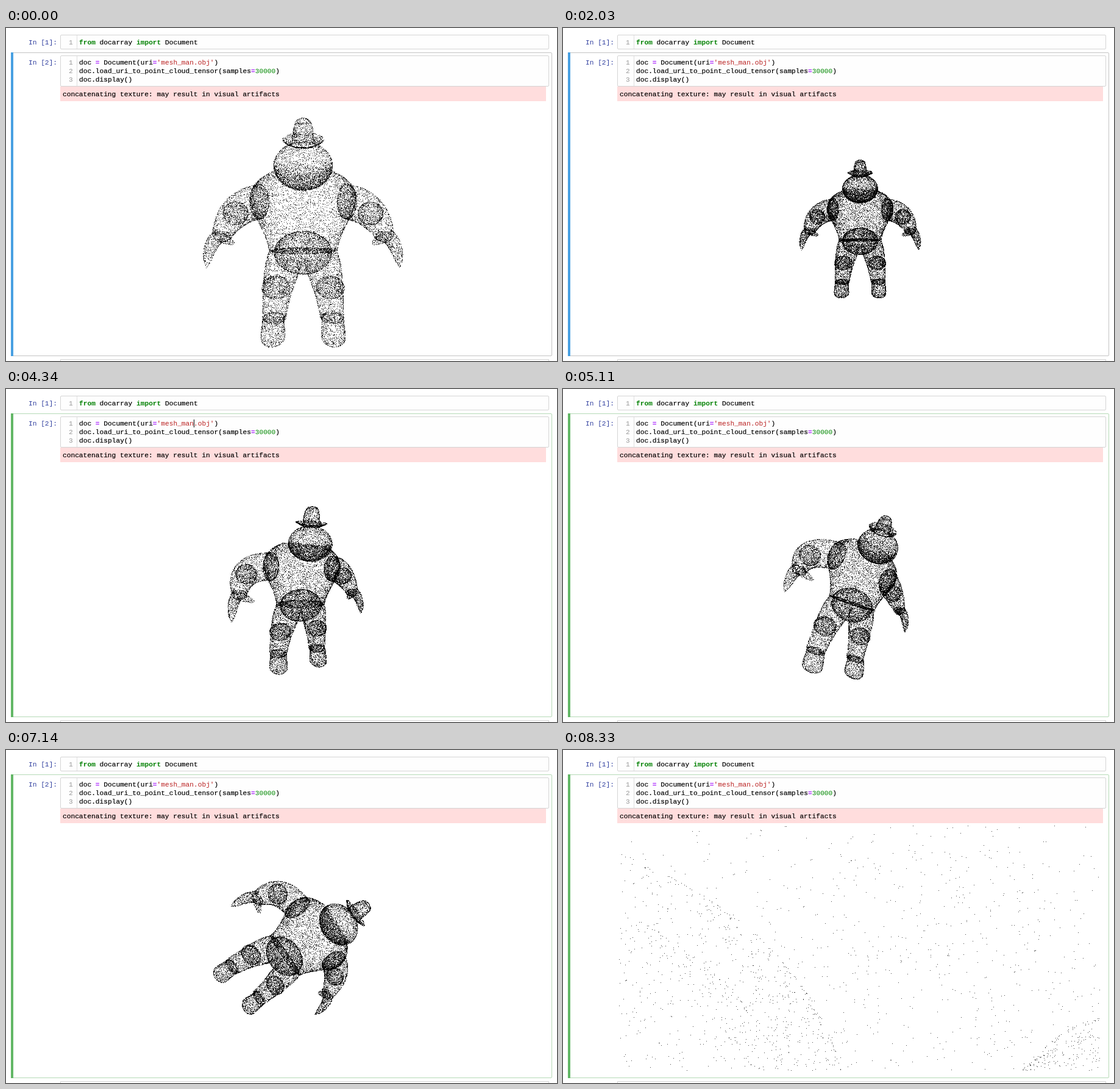
An HTML page with a canvas that plays this animation: 904 by 546 pixels, repeating every 8.4 s.

```html
<!DOCTYPE html>
<html lang="en">
<head>
<meta charset="utf-8">
<title>Point cloud notebook</title>
<style>
html, body { margin: 0; width: 100%; height: 100%; overflow: hidden; background: #fff; }
svg, canvas { position: absolute; left: 0; top: 0; display: block; }
canvas { left: 92px; top: 124px; }
text { font: 11.2px "Liberation Mono", "Courier New", monospace; white-space: pre; fill: #000; stroke: #000; stroke-width: .2px; }
.prompt, .num, tspan { stroke: none; }
.prompt { fill: #303f9f; }
.num { fill: #999; }
.kw { fill: #008000; font-weight: bold; }
.op { fill: #a2f; font-weight: bold; }
.str { fill: #ba2121; }
.lit { fill: #080; }
.box { fill: #fefefe; stroke: #d4d4d4; }
.gutter { stroke: #ddd; }
#frame { fill: #fff; stroke: #c4c4c4; }
#bar { fill: #48a0e2; }
.edit #frame { stroke: #b5dab6; }
.edit #bar { fill: #62b766; }
</style>
</head>
<body>
<svg id="page" width="904" height="546" viewBox="0 0 904 546">
  <rect class="box" x="89.5" y="11.5" width="801" height="23" rx="1.5"/>
  <rect id="frame" x="8.5" y="40.5" width="887" height="497" rx="1.5"/>
  <rect id="bar" x="8" y="40" width="4" height="498"/>
  <rect class="box" x="89.5" y="45.5" width="801" height="50" rx="1.5"/>
  <path class="gutter" d="M116.5 12V34M116.5 46V95"/>
  <rect x="89" y="96" width="797" height="24" fill="#fdd"/>
  <path d="M89.5 546V543.5H890.5V546" fill="none" stroke="#d4d4d4"/>
  <text class="prompt" x="37" y="26.5">In [1]:</text>
  <text class="prompt" x="37" y="60">In [2]:</text>
  <text class="num" x="103" y="26.5">1</text>
  <text class="num" x="103" y="60">1</text>
  <text class="num" x="103" y="74">2</text>
  <text class="num" x="103" y="87.5">3</text>
  <text x="120" y="26.5"><tspan class="kw">from</tspan> docarray <tspan class="kw">import</tspan> Document</text>
  <text x="120" y="60">doc <tspan class="op">=</tspan> Document(uri<tspan class="op">=</tspan><tspan class="str">'mesh_man.obj'</tspan>)</text>
  <text x="120" y="74">doc.load_uri_to_point_cloud_tensor(samples<tspan class="op">=</tspan><tspan class="lit">30000</tspan>)</text>
  <text x="120" y="87.5">doc.display()</text>
  <text x="93" y="111.5">concatenating texture: may result in visual artifacts</text>
  <rect id="caret" x="308" y="50" width="1" height="13"/>
</svg>
<canvas id="view" width="790" height="402"></canvas>
<script>
const LOOP = 8400, STEP = 70, W = 790, H = 402;
const MIDX = 487.5, MIDY = 319, FOCAL = 348, SLICES = 24;
const page = document.getElementById('page');
const caret = document.getElementById('caret');
const ctx = document.getElementById('view').getContext('2d');
const image = ctx.createImageData(W, H);
const alpha = image.data;
const cloud = [];

let seed = 20477;
function rnd() {
  seed = (seed + 0x6D2B79F5) | 0;
  let v = Math.imul(seed ^ (seed >>> 15), 1 | seed);
  v = (v + Math.imul(v ^ (v >>> 7), 61 | v)) ^ v;
  return ((v ^ (v >>> 14)) >>> 0) / 4294967296;
}
const mix = (a, b, u) => a + (b - a) * u;
const span = (t, a, b) => Math.min(1, Math.max(0, (t - a) / (b - a)));

// x, y are stage pixels in the opening view of a part centred at depth z.
function add(x, y, z, dz) {
  const k = 1 - z / FOCAL;
  cloud.push((x - MIDX) * k, (MIDY - y) * k, z + dz);
}

// Skin around the curve a-c-b with radius(u); flat = depth / width.
function tube(a, c, b, radius, flat, density) {
  const at = (u, k) => mix(mix(a[k], c[k], u), mix(c[k], b[k], u), u);
  const slope = (u, k) => 2 * mix(c[k] - a[k], b[k] - c[k], u);
  for (let i = 0; i < SLICES; i++) {
    const mid = (i + 0.5) / SLICES;
    const length = Math.hypot(slope(mid, 0), slope(mid, 1)) / SLICES;
    const flare = radius((i + 1) / SLICES) - radius(i / SLICES);
    const area = Math.PI * radius(mid) * (1 + flat) * Math.hypot(length, flare);
    for (let n = area * density - rnd(); n > 0; n--) {
      const u = (i + rnd()) / SLICES, turn = rnd() * 2 * Math.PI, r = radius(u);
      const dx = slope(u, 0), dy = slope(u, 1), c = r * Math.cos(turn) / Math.hypot(dx, dy);
      add(at(u, 0) + dy * c, at(u, 1) - dx * c, at(u, 2), r * flat * Math.sin(turn));
    }
  }
}
function column(top, bottom, z, radius, flat, density) {
  const a = [MIDX, top, z], b = [MIDX, bottom, z];
  tube(a, a.map((v, k) => (v + b[k]) / 2), b, radius, flat, density);
}
function ball(x, y, z, rx, ry, rz, count, from = -1) {
  while (count-- > 0) {
    const w = mix(from, 1, rnd()), a = rnd() * 2 * Math.PI, s = Math.sqrt(1 - w * w);
    add(x + rx * s * Math.cos(a), y + ry * w, z, rz * s * Math.sin(a));
  }
}

function buildMan() {
  column(152, 187, 22, u => 18.5 * u ** 0.17, 1, 0.13);           // hat
  column(192, 184, 22, u => 18 + 16 * u, 0.9, 0.3);
  ball(MIDX, 228, 24, 48, 38, 42, 1900);                          // head
  ball(MIDX, 228, 20, 47, 37, 40, 1350, 0);
  column(236, 365, -4, u => 47 + 9 * u + 36 * Math.sin(Math.PI * u ** 0.6) ** 1.5, 0.6, 0.078);
  ball(MIDX, 365, -4, 52, 2, 36, 900);                            // waist
  ball(MIDX, 368, -4, 47, 35, 36, 2300);

  for (const side of [1, -1]) {
    const sx = x => MIDX + side * (x - MIDX);
    const flip = ([x, y, z]) => [sx(x), y, z];
    const limb = (a, c, b, ...skin) => tube(flip(a), flip(c), flip(b), ...skin);
    const joint = (x, ...rest) => ball(sx(x), ...rest);
    joint(416, 285, -4, 15, 29, 25, 850);
    limb([416, 285, -4], [369, 293, -44], [353, 344, 0], u => 28 - 14 * u ** 2.2, 0.85, 0.1);
    joint(377, 304, -23, 20, 19, 18, 600);
    joint(355, 342, -2, 14, 9, 11, 200);
    limb([351, 340, 0], [332, 352, 14], [329, 394, 20], u => (12 - 4 * u) * (1 - u ** 6), 0.8, 0.16);
    limb([352, 343, 0], [364, 348, 8], [374, 354, 16], u => 8 - 6 * u * u, 1, 0.16);
    limb([461, 368, -4], [444, 420, -6], [440, 476, -4], u => 27 - 8 * u + 30 * u * (1 - u) ** 3, 0.85, 0.1);
    joint(443, 425, -5, 23, 18, 20, 680);
    joint(440, 475, -4, 18, 6, 16, 280);
    limb([439, 472, -2], [438, 495, 5], [438, 518, 6], u => (17 + 4 * u) * (1 - u ** 12), 1.15, 0.11);
  }
}

// Body axes (right, up) at the moments the drag changes direction.
const POSES = [
  [3850, [1, 0, 0], [0, 1, 0]],
  [4340, [0.913, 0, -0.4], [0.06, 0.985, 0.14]],
  [5880, [0.54, -0.64, -0.545], [0.44, 0.79, -0.43]],
  [6860, [0.56, -0.79, -0.26], [0.82, 0.56, 0.1]]
];
const dot = (a, b) => a[0] * b[0] + a[1] * b[1] + a[2] * b[2];
const unit = a => a.map(v => v / Math.sqrt(dot(a, a)));
const cross = (a, b) => [a[1] * b[2] - a[2] * b[1], a[2] * b[0] - a[0] * b[2], a[0] * b[1] - a[1] * b[0]];

function axes(t) {
  let i = 0;
  while (i < POSES.length - 2 && t > POSES[i + 1][0]) i++;
  const [ta, xa, ua] = POSES[i], [tb, xb, ub] = POSES[i + 1];
  let u = span(t, ta, tb);
  if (i === POSES.length - 2) u = 1 - (1 - u) ** 1.6;
  const x = unit(xa.map((v, k) => mix(v, xb[k], u)));
  const raw = ua.map((v, k) => mix(v, ub[k], u)), skew = dot(raw, x);
  const up = unit(raw.map((v, k) => v - skew * x[k]));
  return [x, up, cross(x, up)];
}

function distance(t) {
  const out = span(t, 280, 1190), back = span(t, 1190, 2800), dive = span(t, 7350, 8330);
  const scale = 0.325 ** (out * out * (3 - 2 * out))
    * (0.751 / 0.325) ** (1 - (1 - back) ** 2)
    * 18.5 ** (dive ** 1.2);
  return FOCAL / scale;
}

function drawCloud(t) {
  const [r, u, f] = axes(t), d = distance(t);
  alpha.fill(0);
  for (let i = 0; i < cloud.length; i += 3) {
    const x = cloud[i], y = cloud[i + 1], z = cloud[i + 2];
    const depth = d - (x * r[2] + y * u[2] + z * f[2]);
    if (depth < 1) continue;
    const s = FOCAL / depth;
    const px = Math.floor(395.5 + s * (x * r[0] + y * u[0] + z * f[0]));
    const py = Math.floor(MIDY - 124 - s * (x * r[1] + y * u[1] + z * f[1]));
    if (px < 0 || px >= W || py < 0 || py >= H) continue;
    const k = (py * W + px) * 4 + 3;
    alpha[k] += (255 - alpha[k]) * 0.72;
  }
  ctx.putImageData(image, 0, 0);
}

const caretOn = t => t >= 3220 && (t - 3720 + 1140) % 1140 >= 570;

let shown = -1;
const start = performance.now();
function tick() {
  const t = Math.floor((performance.now() - start) % LOOP / STEP) * STEP;
  if (t !== shown) {
    shown = t;
    page.classList.toggle('edit', t >= 3150);
    caret.style.visibility = caretOn(t) ? 'visible' : 'hidden';
    drawCloud(t);
  }
  requestAnimationFrame(tick);
}
buildMan();
tick();
</script>
</body>
</html>
```
